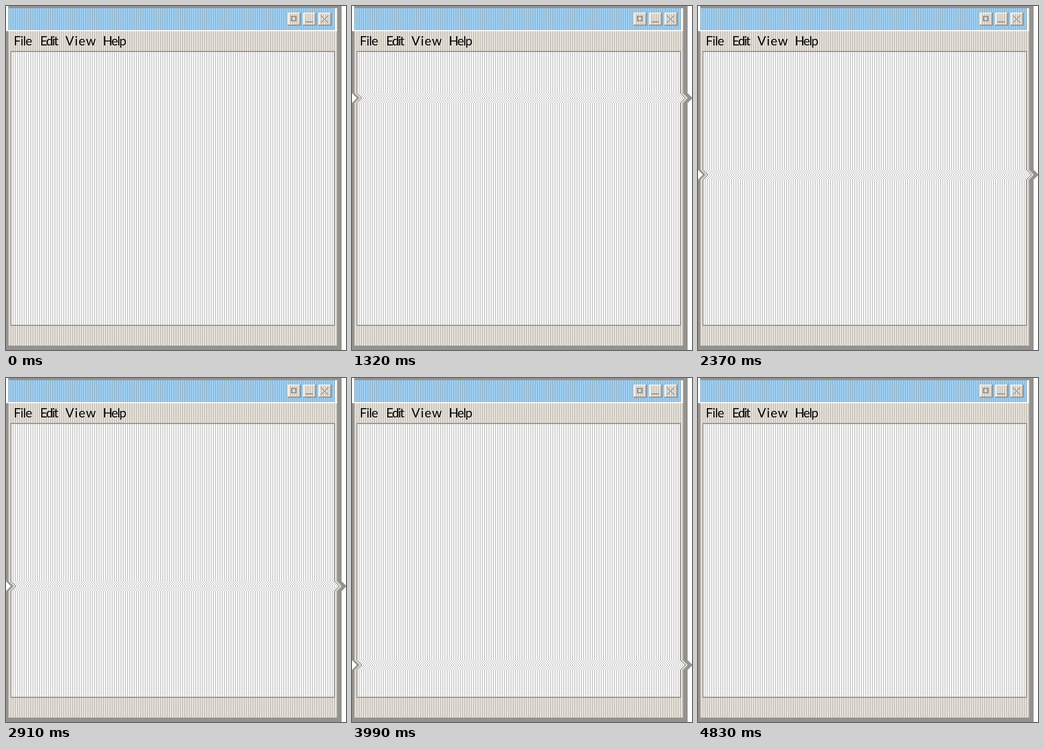
These frames come from a looping animation (618x628 px, 4860 ms). An HTML page with a canvas:

```html
<!DOCTYPE html>
<html lang="en">
<head>
<meta charset="utf-8">
<style>
html, body { margin: 0; width: 100%; height: 100%; overflow: hidden; background: #fff; }
canvas { display: block; }
</style>
</head>
<body>
<canvas id="stage" width="618" height="628"></canvas>
<script>
const W = 618, H = 628, STEP = 30, STEPS = 162, LINE = 2;
const GRAY = '#949290', LIGHT = '#ece8e0', DARK = '#c6c2ba';
const RIPPLE = [2, 4, 6, 8, 8, 6, 4, 2];

const stage = document.getElementById('stage').getContext('2d');
const desktop = document.createElement('canvas');
desktop.width = W;
desktop.height = H;
const ctx = desktop.getContext('2d');

function rect(x, y, w, h, color) {
  ctx.fillStyle = color;
  ctx.fillRect(x, y, w, h);
}

function stripes(x, y, w, h, light, dark) {
  rect(x, y, w, h, light);
  for (let sx = Math.ceil(x / 4) * 4; sx < x + w; sx += 4) rect(sx, y, 2, h, dark);
}

function button(x) {
  stripes(x, 12, 24, 24, LIGHT, DARK);
  rect(x, 12, 24, 2, '#f4f0e8');
  rect(x, 12, 2, 24, '#f4f0e8');
  rect(x, 34, 24, 2, GRAY);
  rect(x + 22, 12, 2, 24, GRAY);
}

function label(text, x, spacing) {
  ctx.letterSpacing = spacing + 'px';
  ctx.fillText(text, x, 72);
}

function drawWindow() {
  rect(0, 0, W, H, '#fff');
  stripes(4, 4, 594, 40, '#a2d4fa', '#92b6ce');
  stripes(4, 46, 598, 574, LIGHT, DARK);
  rect(600, 4, 2, 40, LIGHT);
  rect(4, 0, 606, 4, GRAY);
  rect(0, 46, 4, 582, GRAY);
  rect(602, 0, 8, H, GRAY);
  rect(0, 620, 610, 8, GRAY);
  rect(8, 82, 590, 502, GRAY);
  stripes(10, 84, 586, 498, '#fff', '#cecece');

  [512, 540, 568].forEach(button);
  ctx.strokeStyle = GRAY;
  ctx.lineWidth = 2;
  ctx.strokeRect(519, 19, 8, 8);
  rect(544, 28, 14, 2, GRAY);
  for (let i = 0; i < 7; i++) {
    rect(572 + i * 2, 17 + i * 2, 2, 2, GRAY);
    rect(584 - i * 2, 17 + i * 2, 2, 2, GRAY);
  }

  ctx.fillStyle = '#000';
  ctx.font = '23px Lato, sans-serif';
  label('File', 14, -0.8);
  label('Edit', 62, -2);
  label('View', 108, 1.4);
  label('Help', 176, -1.6);
}

function render(now) {
  const step = Math.floor(now / STEP) % STEPS;
  const top = step * 4 - 16;
  stage.drawImage(desktop, 0, 0);
  RIPPLE.forEach((shift, i) => {
    const y = top + i * LINE;
    if (y < 0 || y >= H) return;
    stage.fillStyle = '#fff';
    stage.fillRect(0, y, shift, LINE);
    stage.drawImage(desktop, 0, y, W - shift, LINE, shift, y, W - shift, LINE);
  });
  requestAnimationFrame(render);
}

drawWindow();
requestAnimationFrame(() => render(performance.now()));
</script>
</body>
</html>
```
